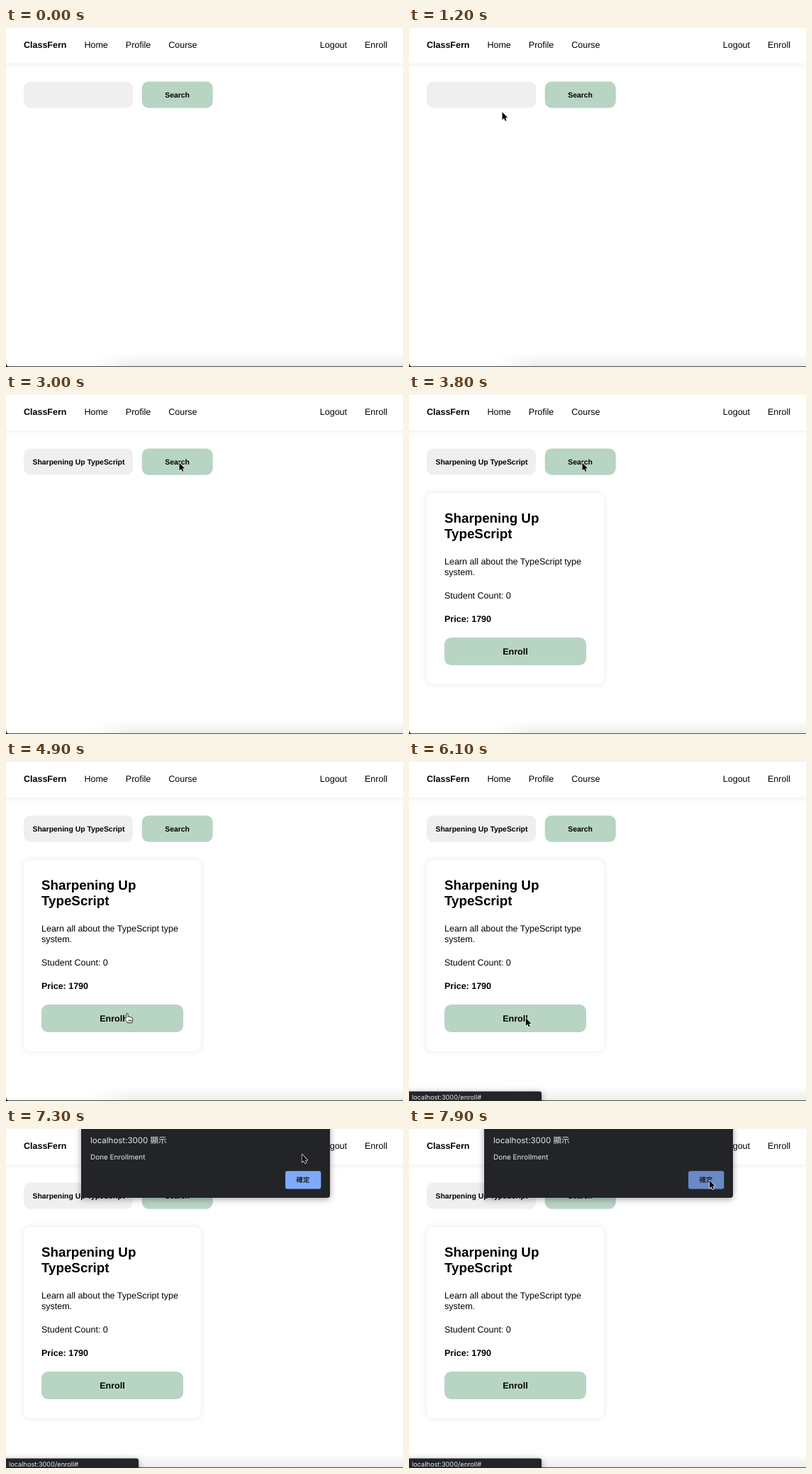
An HTML page for the animation above (8000 ms loop, 560 px wide and 478 px high).

```html
<!DOCTYPE html>
<html lang="en">
<head>
<meta charset="utf-8">
<title>Course search</title>
<style>
  html, body { margin: 0; width: 100%; height: 100%; overflow: hidden; background: #fff; }
  svg { display: block; width: 100vw; height: 100vh; }
  text { font: 12.5px "Liberation Sans", Arial, sans-serif; fill: #000; text-rendering: geometricPrecision; }
  .b { font-weight: 700; }
  .small { font-size: 10.42px; font-weight: 700; }
  .title { font-size: 18.75px; font-weight: 700; }
  .mid { text-anchor: middle; }
  .end { text-anchor: end; }
  .green { fill: #b8d4c3; }
  .ui { font-family: Inter, "Noto Sans CJK TC", "Noto Sans CJK", sans-serif; fill: #e8eaed; }
  .soft { fill: #fff; filter: drop-shadow(0 0 4px rgba(0,0,0,.09)); }
  .pop { fill: #222428; filter: drop-shadow(0 2px 5px rgba(0,0,0,.35)); }
</style>
</head>
<body>
<svg viewBox="0 0 560 478" preserveAspectRatio="none">
  <defs>
    <linearGradient id="rise" x2="0" y2="1">
      <stop offset="0" stop-color="#fff"/><stop offset="1" stop-color="#ededed"/>
    </linearGradient>
    <linearGradient id="side">
      <stop offset="0" stop-color="#fff"/><stop offset="1" stop-color="#fff" stop-opacity="0"/>
    </linearGradient>
  </defs>

  <rect width="560" height="478" fill="#fff"/>
  <rect x="120" y="458" width="440" height="19" fill="url(#rise)"/>
  <rect x="119" y="457" width="60" height="20" fill="url(#side)"/>
  <rect y="476.9" width="560" height="1.1" fill="#555"/>
  <path d="M0 471.5Q.3 476.5 3.5 478H0Z" fill="#111"/>

  <rect class="soft" x="-10" y="-10" width="580" height="60"/>
  <text x="25" y="28.4"><tspan class="b">ClassFern</tspan><tspan dx="25">Home</tspan><tspan dx="25">Profile</tspan><tspan dx="25">Course</tspan></text>
  <text class="end" x="538" y="28.4"><tspan>Logout</tspan><tspan dx="25">Enroll</tspan></text>

  <rect x="25" y="75.4" width="154" height="37.4" rx="9.4" fill="#efefef"/>
  <text class="small" x="37.5" y="97.7" data-from="1900">Sharpening Up TypeScript</text>
  <rect x="37.3" y="88.5" width=".8" height="11.5" data-from="1500" data-to="1900"/>
  <rect x="168" y="88.5" width=".8" height="11.5" data-from="1900" data-to="2500"/>
  <rect class="green" x="191.7" y="75.4" width="100" height="37.4" rx="9.4"/>
  <text class="small mid" x="241.6" y="97.7">Search</text>

  <g data-from="3800">
    <rect class="soft" x="25" y="138" width="250" height="270" rx="9.4"/>
    <text class="title" x="50" y="180">Sharpening Up</text>
    <text class="title" x="50" y="201.5">TypeScript</text>
    <text x="50" y="239.3">Learn all about the TypeScript type</text>
    <text x="50" y="253.7">system.</text>
    <text x="50" y="286.7">Student Count: 0</text>
    <text class="b" x="50" y="319.8">Price: 1790</text>
    <rect class="green" x="50" y="342" width="200" height="39" rx="9.4"/>
    <text class="b mid" x="150" y="366">Enroll</text>
  </g>

  <g data-from="5300">
    <path class="pop" d="M-5 464.5H184Q187 464.5 187 467.5V485H-5Z"/>
    <text class="ui" x="4" y="476.3" style="font-size:9.2px">localhost:3000/enroll#</text>
  </g>

  <g data-from="6200">
    <path class="pop" d="M106-8H457V93Q457 97 453 97H110Q106 97 106 93Z"/>
    <text class="ui" x="119" y="20.3" style="font-size:11.5px">localhost:3000 顯示</text>
    <text class="ui" x="119" y="43.2" style="font-size:9.95px">Done Enrollment</text>
    <rect x="394" y="59.3" width="50.3" height="25.2" rx="3" fill="#7faaf9"/>
    <rect id="shade" x="394" y="59.3" width="50.3" height="25.2" rx="3" fill="#222428"/>
    <text class="ui mid b" x="419" y="75.4" style="font-size:9.4px;fill:#202124">確定</text>
  </g>

  <g id="cursor" stroke-linejoin="round">
    <path id="arrow" d="M0 0V11L2.5 8.7 4.2 12.6 6 11.8 4.3 8H7.7Z"
          stroke="#fff" stroke-width="1.3" paint-order="stroke"/>
    <path data-from="4900" data-to="6000" fill="#fff" stroke="#111" stroke-width=".9"
          d="M-1.2 1.2C-1.2-.4 1.2-.4 1.2 1.2V5C1.4 4.2 3.4 4.2 3.4 5.4 3.8 4.8 5.6 5 5.6 6.2 6.2 5.6 7.8 6 7.8 7.2V9.6C7.8 11 7 11.6 7 13.4H.6C.4 11.6-1.4 10.6-2.2 9-2.8 8-4 7-3.4 6.2-2.8 5.6-1.8 6.4-1.2 7.2ZM2.2 9V11.5M4 9V11.5M5.8 9V11.5"/>
    <path data-from="1300" data-to="1900" fill="none" stroke="#222" stroke-width=".9"
          d="M-2-6Q0-6 0-4.8Q0-6 2-6M0-5V5M-2 6Q0 6 0 4.8Q0 6 2 6"/>
  </g>
</svg>
<script>
const LOOP = 8000, STEP = 100;
const $ = id => document.getElementById(id);
const timed = [...document.querySelectorAll("[data-from]")];

// Pointer glides: begin, end, and where each one comes to rest
const glides = [
  [600, 700, 340, 267],
  [800, 1200, 131.5, 118.5],
  [1200, 1500, 120, 95],
  [1900, 2100, 189, 120.5],
  [2400, 2700, 244.5, 95.5],
  [4400, 4800, 213, 308],
  [4800, 5000, 164.8, 361],
  [6800, 7000, 408, 56],
  [7100, 7400, 418, 35],
  [7400, 7900, 424, 72.5]
];

const within = (t, a, b) => t >= a && t < b;
const show = (el, on) => el.setAttribute("visibility", on ? "inherit" : "hidden");
const ramp = (t, a, b) => Math.min(1, Math.max(0, (t - a) / (b - a)));
const easeOut = k => 1 - (1 - k) ** 3;

function pointer(t) {
  let x = 377, y = 300;
  for (const [a, b, toX, toY] of glides) {
    const k = easeOut(ramp(t, a, b));
    x += (toX - x) * k;
    y += (toY - y) * k;
  }
  return `translate(${x} ${y})`;
}

function draw(ms) {
  const t = Math.floor(ms % LOOP / STEP) * STEP;
  for (const el of timed) {
    show(el, within(t, +el.dataset.from, +(el.dataset.to || LOOP)));
  }
  $("cursor").setAttribute("transform", pointer(t));
  show($("arrow"), t >= 600 && !within(t, 1300, 2000) && !within(t, 4900, 6000));
  $("shade").setAttribute("opacity", 0.24 * ramp(t, 7500, 7800));
}

const start = performance.now();
function tick() {
  draw(performance.now() - start);
  requestAnimationFrame(tick);
}
tick();
</script>
</body>
</html>
```
